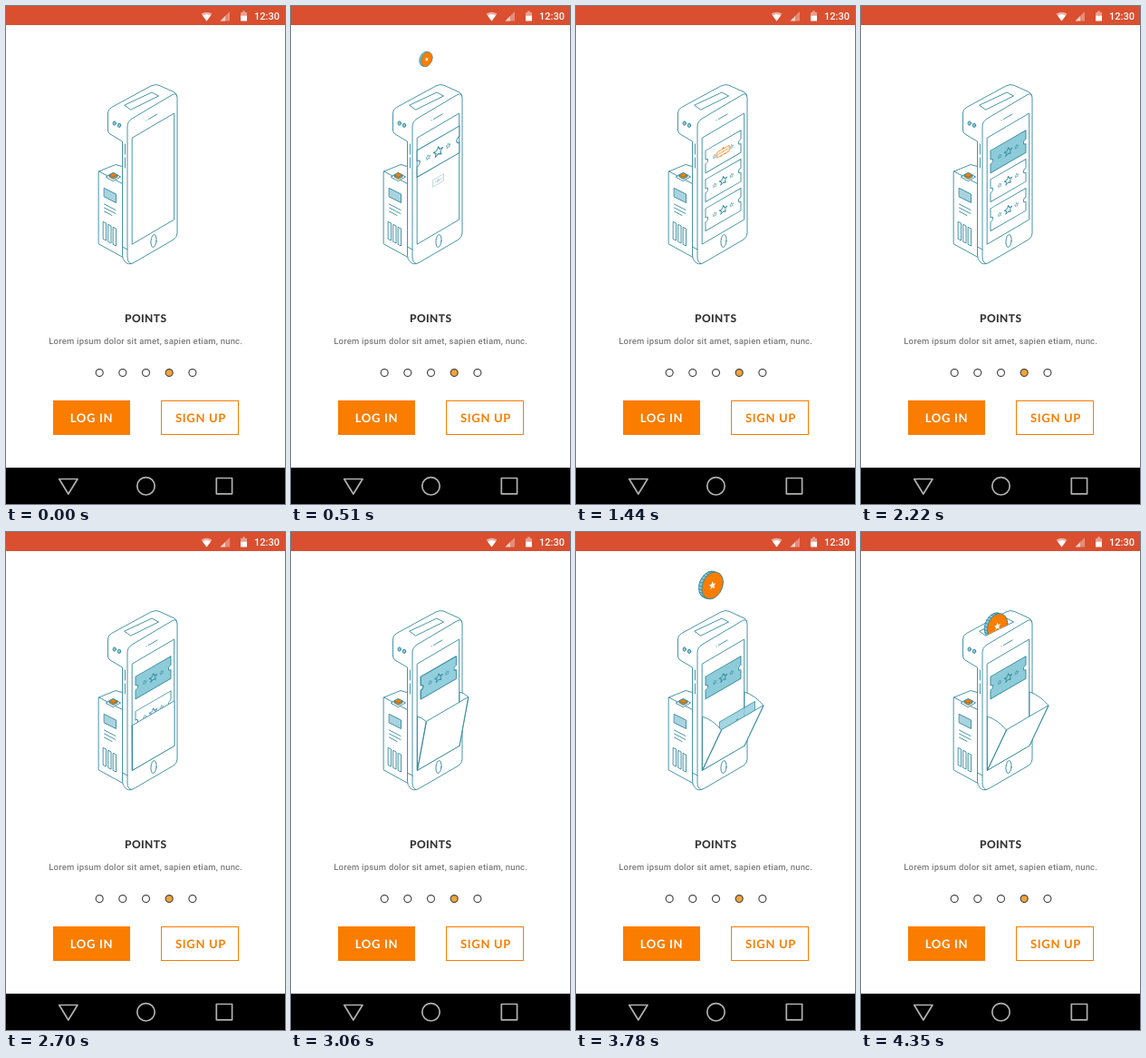
These frames come from a looping animation (308x548 px, 4.53 s). An HTML page:

```html
<!DOCTYPE html>
<html lang="en">
<head>
<meta charset="utf-8">
<title>Points onboarding</title>
<style>
  html, body { margin: 0; width: 100%; height: 100%; overflow: hidden; background: #fff; }
  svg { display: block; width: 100vw; height: 100vh; }
  .line { fill: none; stroke: #34899f; stroke-width: .9; stroke-linejoin: round; stroke-linecap: round; }
  .white { fill: #fff; }
  .blue { fill: #8dcbd9; }
  .orange { fill: #fa7d00; }
  text { text-anchor: middle; text-rendering: geometricPrecision; }
  .head { font: 800 12px Lato, "Open Sans", sans-serif; letter-spacing: .4px; }
  .btn { font: 700 13px Lato, "Open Sans", sans-serif; letter-spacing: .7px; }
  .body { font: 500 9.5px Roboto, sans-serif; letter-spacing: .21px; }
</style>
</head>
<body>
<svg viewBox="0 0 308 548">
  <defs>
    <clipPath id="aboveSlot"><path d="M100 0H200V83.5L100 132.7Z"/></clipPath>
    <clipPath id="inScreen"><path d="M139 145L186 118V235L139 262Z"/></clipPath>
    <clipPath id="aboveFlap"><path id="pocketMouth"/></clipPath>
    <path id="star" d="M0-4.5L1.3-1.5 4.3-1.4 2 .7 2.7 3.7 0 2-2.7 3.7-2 .7-4.3-1.4-1.3-1.5Z"/>
    <g id="ticket">
      <path d="M-19.5-12.3H19.5V-2.6A2.6 2.6 0 0 0 19.5 2.6V12.3H-19.5V2.6A2.6 2.6 0 0 0-19.5-2.6Z"/>
      <use href="#star"/>
      <use href="#star" transform="translate(-9.3) scale(.48)"/>
      <use href="#star" transform="translate(9.3) scale(.48)"/>
    </g>
  </defs>

  <rect width="308" height="548" fill="#fff"/>
  <rect width="308" height="21" fill="#d94f30"/>
  <g fill="#fff">
    <path d="M215.500 8.500Q221.500 5 227.500 8.500L221.500 16.500Z" opacity=".55"/>
    <path d="M217 10.500Q221.500 8 226 10.500L221.500 16.500Z"/>
    <path d="M247 6V16.500H236.500Z" opacity=".35"/>
    <path d="M242 11V16.500H236.500Z" opacity=".6"/>
    <path d="M259 7H261V5.500H264V7H266V10.500H259Z" opacity=".45"/>
    <path d="M259 10.500H266V16.500H259Z"/>
    <text x="288" y="14.700" font-family="Roboto, sans-serif" font-size="11" font-weight="500">12:30</text>
  </g>

  <!-- back unit -->
  <g class="line">
    <path class="white" d="M102.500 182L121 174.500 130 177V277L102.500 262Z"/>
    <path d="M102.500 182L129.500 196"/>
    <path class="white" d="M110.500 188L118.500 183.500 126.500 188 118.500 192.500Z"/>
    <path class="orange" d="M114 186V188L118.500 190.500 123 188V186L118.500 183.700Z"/>
    <path d="M114 186L118.500 188.300 123 186"/>
    <path d="M108.500 200.500L121.500 207V216.500L108.500 210Z" fill="#a9d3df"/>
    <path d="M108.500 218L121 224.500M108.500 222L121 228.500M108.500 226L117 230.500"/>
    <path d="M107.500 237.500L110.500 239V258L107.500 256.500ZM113 240.500L116 242V261L113 259.500ZM118.500 243.500L121.500 245V264L118.500 262.500Z"/>
  </g>

  <!-- phone -->
  <g class="line">
    <path class="white" d="M112.500 136.500V118Q112.500 113.500 116.500 111.500L160 88Q165 85.500 169 87.300L186 95Q189 97 189 101V250Q189 254 185 257L141 282.500Q135 285.500 131.500 281.500Q128.500 279 128.500 274V149L115 141Q112.500 139.500 112.500 136.500Z"/>
    <path d="M138 283.500Q134 282 134 276V133Q134 127 139 124L183 98Q187 95.500 188.500 98.500M128.500 265L134 268M131.500 152V163M131.500 167V178"/>
    <path d="M131 109L161 95 168.500 99 138 114Z"/>
    <path d="M139.500 145L185.700 118V235L139.500 262Z"/>
    <path d="M157.500 124.500L167 119M155 126V125.800"/>
    <ellipse cx="163" cy="258.500" rx="3" ry="7" transform="rotate(6 163 258.500)"/>
    <ellipse class="blue" cx="119.700" cy="129" rx="1.700" ry="2.200"/>
    <ellipse class="blue" cx="125" cy="131.300" rx="1.700" ry="2.200"/>
  </g>

  <g class="line" style="fill:#fff">
    <use id="t1" href="#ticket"/>
    <g clip-path="url(#inScreen)">
      <use id="t2" href="#ticket"/>
      <use id="t3" href="#ticket"/>
    </g>
  </g>
  <g id="label">
    <rect x="-17" y="-8" width="34" height="16" fill="#fff" stroke="#fa7d00" stroke-width=".8" vector-effect="non-scaling-stroke"/>
    <text class="orange" y="2.400" font-family="Lato, sans-serif" font-size="7" font-weight="900">POINTS</text>
  </g>

  <path id="gusset" class="line" style="fill:#fff"/>
  <g clip-path="url(#aboveFlap)">
    <use id="copy" href="#ticket" class="line" style="fill:#95d0de" opacity=".86"/>
  </g>
  <path id="flap" class="line" style="fill:#fff"/>

  <g clip-path="url(#aboveSlot)">
    <g id="coin" class="line">
      <g transform="matrix(.82 -.25 0 1 -1.600 -.500)">
        <circle class="blue" r="13.700"/>
        <path id="ridges"/>
      </g>
      <g transform="matrix(.82 -.25 0 1 1.600 .300)">
        <circle class="orange" r="13.700"/>
        <use href="#star" style="fill:#fff;stroke:none"/>
      </g>
    </g>
  </g>

  <text class="head" x="154.200" y="347.500" fill="#333">POINTS</text>
  <text class="body" x="154.200" y="372" fill="#7d7d7d">Lorem ipsum dolor sit amet, sapien etiam, nunc.</text>
  <g fill="#fff" stroke="#4a4a4a" stroke-width="1.200">
    <circle cx="103.200" cy="403.600" r="4"/>
    <circle cx="128.800" cy="403.600" r="4"/>
    <circle cx="154.500" cy="403.600" r="4"/>
    <circle cx="180.200" cy="403.600" r="4" fill="#f2a338"/>
    <circle cx="205.900" cy="403.600" r="4"/>
  </g>
  <rect x="52" y="434" width="85" height="38" class="orange"/>
  <text class="btn" x="94.500" y="458" fill="#fff">LOG IN</text>
  <rect x="171.500" y="434.500" width="85" height="37" fill="#fff" stroke="#fa7d00"/>
  <text class="btn orange" x="215" y="458">SIGN UP</text>

  <rect y="508" width="308" height="40" fill="#000"/>
  <g fill="none" stroke="#b0b0b0" stroke-width="1.700" stroke-linejoin="round">
    <path d="M58.700 520.500H79L68.800 537Z"/>
    <circle cx="154.500" cy="528.300" r="9.700"/>
    <rect x="232.300" y="519.500" width="17.300" height="17.300"/>
  </g>
</svg>
<script>
const LOOP = 4530, SKEW = -.575, CX = 162.5;
const $ = id => document.getElementById(id);
const part = (t, from, to) => Math.min(1, Math.max(0, (t - from) / (to - from)));
const smooth = u => u * u * (3 - 2 * u);
const show = (el, on) => el.style.display = on ? '' : 'none';

// Grow past full size, then settle
function pop(t, start, length, peak) {
  const u = part(t, start, start + length);
  return u < .6 ? u / .6 * peak : peak + (1 - peak) * (u - .6) / .4;
}

// Place an element on the plane of the screen
function place(id, x, y, s) {
  show($(id), s > 0);
  $(id).setAttribute('transform', `matrix(${s} ${SKEW * s} 0 ${s} ${x} ${y})`);
}

function drawCoin(t) {
  const second = t > 2000;
  const s = second ? pop(t, 3480, 330, 1.24) : pop(t, 420, 330, 1.24);
  const dt = t - (second ? 4050 : 960);
  const limit = second ? 300 : 360;
  let y = 58.5;
  if (dt > 0) {
    const u = Math.min(dt, limit) / 150;
    y += u < 1 ? -9 * smooth(u) : -9 + 54 * (u - 1) ** 2;
  }
  show($('coin'), s > 0 && (second || dt < limit));
  $('coin').setAttribute('transform', `translate(149 ${y}) scale(${s})`);
}

function drawFlap(t) {
  const reach = 59 * part(t, 2250, 2790);
  const angle = .42 * smooth(part(t, 2850, 3300));
  const dx = reach * .87 * Math.sin(angle);
  const dy = reach * (.4 * Math.sin(angle) - Math.cos(angle));
  const lx = 139.5 + dx, ly = 262 + dy, rx = 186 + dx, ry = 235 + dy;
  const bend = `${dx * .55} ${(dy + reach) * .25}`;
  const fold = `${dx} ${dy + reach}`;

  show($('flap'), reach > 0);
  show($('gusset'), angle > 0);
  $('gusset').setAttribute('d', `M186 235v${-reach}q${bend} ${fold}Z`);
  $('flap').setAttribute('d',
    `M139.5 262v${-reach}q${bend} ${fold}ZM139.5 262L${lx} ${ly} ${rx} ${ry} 186 235Z`);
  $('pocketMouth').setAttribute('d',
    `M100 0H260V${ry + SKEW * (260 - rx)}L100 ${ly + SKEW * (100 - lx)}Z`);
}

function draw(t) {
  const press = Math.sin(Math.PI * part(t, 2040, 2220));
  const slide = 60 * part(t, 2580, 2950) ** 2;
  place('t1', CX, 160.2, pop(t, 330, 300, 1.2) * (1 + .06 * press));
  place('t2', CX, 192 + slide, t < 2950 ? pop(t, 465, 300, 1.2) : 0);
  place('t3', CX, 224 + slide, t < 2950 ? pop(t, 600, 300, 1.2) : 0);

  const fill = part(t, 2070, 2190);
  $('t1').style.fill = `rgb(${255 - 114 * fill},${255 - 52 * fill},${255 - 38 * fill})`;
  place('label', CX, 160.2, pop(t, 1380, 300, 1.15) * (1 - part(t, 2040, 2160)));

  const out = smooth(part(t, 3030, 3300));
  const fall = 62 * part(t, 3480, 3840) ** 2;
  place('copy', CX + 15.5 * out, 160.2 + 6.5 * out + fall, t > 3030 && t < 3840 ? 1 : 0);

  drawFlap(t);
  drawCoin(t);
}

let ridges = '';
for (let a = 1.5; a < 4.9; a += .26) {
  ridges += `M${13.7 * Math.cos(a)} ${13.7 * Math.sin(a)}l3.9 2`;
}
$('ridges').setAttribute('d', ridges);

const start = performance.now();
function tick() {
  draw((performance.now() - start) % LOOP);
  requestAnimationFrame(tick);
}
tick();
</script>
</body>
</html>
```
